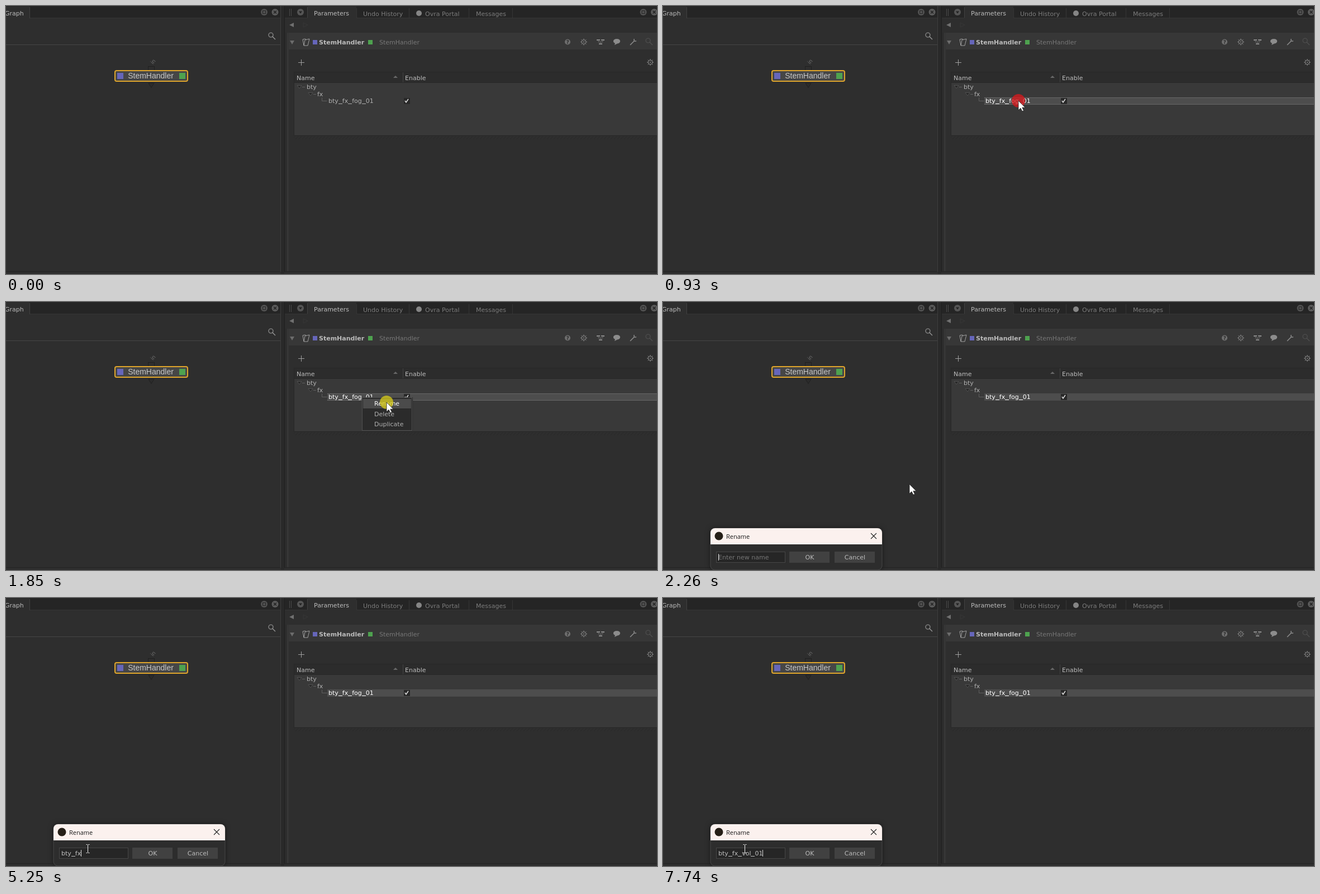
Recreate the animation shown at these times as an HTML page with a canvas. Size 1165 by 481 pixels, loop 8000 ms.

```html
<!DOCTYPE html>
<html lang="en">
<head>
<meta charset="utf-8">
<title>Rename a pass</title>
<style>
html, body { margin: 0; width: 100%; height: 100%; overflow: hidden; background: #2e2e2e; }
canvas { display: block; }
</style>
</head>
<body>
<canvas id="stage" width="1165" height="481"></canvas>
<script>
const ctx = document.getElementById('stage').getContext('2d');
const UI = '11px "DejaVu Sans", sans-serif';
const BOLD = 'bold ' + UI;
const ICON = '#8c8c8c';
const LOOP = 8000, STEP = 83.5;
const NODE = 'StemHandler';

function rect(x, y, w, h, color) {
  ctx.fillStyle = color;
  ctx.fillRect(x, y, w, h);
}

function frame(x, y, w, h, color) {
  ctx.strokeStyle = color;
  ctx.lineWidth = 1;
  ctx.strokeRect(x + .5, y + .5, w - 1, h - 1);
}

function circle(x, y, r, color) {
  ctx.fillStyle = color;
  ctx.beginPath();
  ctx.arc(x, y, r, 0, 7);
  ctx.fill();
}

function shape(d, x, y, fill, stroke, width = 1) {
  const path = new Path2D(d);
  ctx.save();
  ctx.translate(x, y);
  if (fill) { ctx.fillStyle = fill; ctx.fill(path); }
  if (stroke) { ctx.strokeStyle = stroke; ctx.lineWidth = width; ctx.stroke(path); }
  ctx.restore();
}

// Underscores are drawn one digit wide; returns the end of the text.
function text(s, x, y, color, font = UI, align = 'left') {
  ctx.font = font;
  ctx.textAlign = align;
  ctx.fillStyle = color;
  s.split('_').forEach((part, i) => {
    if (i) {
      ctx.fillRect(Math.round(x), y + 1, 7, 1);
      x += 7;
    }
    ctx.fillText(part, x, y);
    x += ctx.measureText(part).width;
  });
  return x;
}

function windowButtons(x) {
  circle(x, 11, 6, '#525252');
  frame(x - 3, 8, 6, 6, '#252525');
  circle(x + 19.5, 11, 6, '#5c5c5c');
  shape('M-2.5-2.5L2.5 2.5M2.5-2.5L-2.5 2.5', x + 19.5, 11, null, '#222', 1.5);
}

function gear(x, y) {
  ctx.strokeStyle = ICON;
  ctx.lineWidth = 1;
  ctx.beginPath();
  ctx.arc(x, y, 3.8, 0, 7);
  for (let i = 0; i < 8; i++) {
    const c = Math.cos(i * Math.PI / 4), s = Math.sin(i * Math.PI / 4);
    ctx.moveTo(x + 4 * c, y + 4 * s);
    ctx.lineTo(x + 6 * c, y + 6 * s);
  }
  ctx.stroke();
  circle(x, y, 1, ICON);
}

function magnifier(x, y, color) {
  shape('M3-1A4 4 0 1 1-5-1A4 4 0 1 1 3-1M2 2L7 7', x, y, null, color, 1.1);
}

function drawGraph() {
  rect(0, 0, 491, 21, '#252525');
  rect(0, 1, 42, 21, '#2e2e2e');
  rect(42, 2, 1, 20, '#414141');
  rect(43, 21, 448, 1, '#363636');
  text('Graph', -2, 17, '#bcbcbc');
  windowButtons(462);
  magnifier(475, 53, '#a0a0a0');
  rect(0, 69, 491, 1, '#454545');
  rect(0, 476, 491, 1, '#242424');
  rect(491, 0, 1, 477, '#3d3d3d');
  rect(492, 0, 6, 481, '#292929');
  rect(498, 0, 1, 477, '#1e1e1e');

  ctx.save();
  ctx.translate(263, 105);
  ctx.rotate(-.85);
  text('in', 0, 0, '#6c6c6c', '10px "Liberation Sans", sans-serif');
  ctx.restore();
  frame(254, 108, 12, 8, '#202020');
  shape('M-5 0H5L0 8Z', 260, 138.5, '#2b2b2b', '#202020');
  ctx.beginPath();
  ctx.roundRect(195, 116, 130, 19, 3);
  ctx.fillStyle = '#464646';
  ctx.fill();
  ctx.strokeStyle = '#dfa52b';
  ctx.lineWidth = 2;
  ctx.stroke();
  rect(199, 120, 11, 11, '#6666ba');
  rect(310, 120, 11, 11, '#4ea24f');
  text(NODE, 259, 130, '#c8c8c8', '14px "Liberation Sans", Arial, sans-serif', 'center');
}

function drawTabs() {
  rect(499, 0, 666, 21, '#252525');
  rect(499, 21, 666, 1, '#363636');
  rect(540, 1, 87, 21, '#2e2e2e');
  rect(539, 2, 1, 19, '#414141');
  for (const x of [627, 721, 828, 906]) rect(x, 4, 1, 17, '#363636');
  rect(507, 5, 1, 13, '#4a4a4a');
  rect(510, 5, 1, 13, '#4a4a4a');
  circle(527, 11, 6, '#555');
  shape('M-3-1.5H3L0 2.5Z', 527, 11, '#222');
  text('Parameters', 551, 17, '#bcbcbc');
  text('Undo History', 639, 18, '#7c7c7c');
  circle(739, 13, 5, '#858585');
  text('Ovra Portal', 750, 18, '#7c7c7c');
  text('Messages', 841, 18, '#7c7c7c');
  windowButtons(1140.5);
}

function drawHeader() {
  shape('M4-4V4L-4 0Z', 511, 34, '#707070');
  shape('M-4-4V4L4 0Z', 536, 34, null, '#373737');
  rect(501, 48, 1, 428, '#262626');
  rect(502, 48, 4, 428, '#353535');
  rect(506, 48, 659, 30, '#373737');
  rect(499, 476, 666, 1, '#242424');
  shape('M-4-3H4L0 4Z', 512, 65, '#6c6c6c');
  shape('M-4 6H3L6-6L-2-4ZM-4 6L-6-5L-2-6L0-5', 537, 65, null, '#a0a0a0');
  rect(549, 61, 8, 8, '#6666ba');
  text(NODE, 560, 69, '#bcbcbc', BOLD);
  rect(648, 61, 8, 8, '#4ea24f');
  text(NODE, 668, 69, '#777');

  circle(1005, 64.5, 5, '#6e6e6e');
  text('?', 1005, 68, '#2e2e2e', 'bold 9px "DejaVu Sans", sans-serif', 'center');
  gear(1034, 64.5);
  rect(1057, 60, 6, 2, ICON);
  rect(1065, 60, 6, 2, ICON);
  rect(1061, 67, 6, 2, ICON);
  shape('M-4-2V0H4V-2M0 0V2', 1064, 64.5, null, '#6c6c6c');
  shape('M0-5C8-5 8 3 1 3.5L-4 6L-3 3C-8 1-7-5 0-5Z', 1093, 64, ICON);
  shape('M-5 5L2-2M2-6V-2H6', 1122, 65, null, ICON, 1.5);
  magnifier(1150, 63, '#525252');
}

function drawTable(selected, focused) {
  shape('M-5.5 0H5.5M0-5.5V5.5', 528.5, 101.5, null, '#a0a0a0');
  gear(1153, 101);
  rect(515, 118, 650, 115, '#393939');
  rect(516, 119, 649, 18, '#2c2c2c');
  frame(515, 118, 660, 115, '#272727');
  rect(516, 137, 649, 1, '#282828');
  rect(710, 119, 1, 18, '#414141');
  text('Name', 520, 133, '#bcbcbc');
  text('Enable', 714, 133, '#bcbcbc');
  shape('M-4 2H4L0-2Z', 697, 127, '#686868');

  ctx.save();
  ctx.beginPath();
  ctx.rect(515, 234, 650, 5);
  ctx.clip();
  for (let x = 512; x < 1170; x += 6) shape('M0 6L6 0', x, 233, null, '#282828');
  ctx.restore();

  for (const [x, y] of [[525, 145], [545, 158]]) {
    shape('M-4-2.5H4L0 3Z', x, y, '#282828', '#505050');
    rect(x + 5, y, 5, 1, '#606060');
  }
  shape('M0 0V6H9', 565.5, 164.5, null, '#606060');
  text('bty', 538, 149, '#b0b0b0');
  text('fx', 557, 162, '#b0b0b0');
  if (selected) rect(575, 164, 590, 13, '#4d4d4d');
  if (focused) {
    for (let x = 575; x < 1165; x += 2) {
      rect(x, 164, 1, 1, '#808080');
      rect(x, 176, 1, 1, '#808080');
    }
  }
  text('bty_fx_fog_01', 577, 174, selected ? '#fff' : '#b0b0b0');
  rect(712, 165, 11, 11, '#282828');
  shape('M-3 0L-1 3L3-3', 717, 170, null, '#ddd', 1.5);
}

function drawMenu(hover) {
  rect(637, 171, 91, 60, '#2b2b2b');
  frame(637, 171, 90, 60, '#505050');
  if (hover) rect(639, 174, 86, 17, '#4b4b4b');
  text('Rename', 659, 186, hover ? '#fff' : '#b0b0b0');
  text('Delete', 659, 205, '#b0b0b0');
  text('Duplicate', 659, 223, '#b0b0b0');
}

const keys = [4020, 4670, 4920, 5170, 5250, 5250, 5660, 5930, 6090, 6340, 7250, 7660, 7740];

function drawDialog(t) {
  ctx.save();
  ctx.shadowColor = '#0008';
  ctx.shadowBlur = 10;
  ctx.beginPath();
  ctx.roundRect(85, 406, 307, 75, 8);
  ctx.fillStyle = '#2d2d2d';
  ctx.fill();
  ctx.shadowBlur = 0;
  ctx.strokeStyle = '#484848';
  ctx.lineWidth = 1;
  ctx.stroke();
  ctx.clip();
  rect(85, 406, 307, 29, '#fbf1ee');
  ctx.restore();
  circle(100, 420, 7.5, '#251f17');
  text('Rename', 113, 424.5, '#191919', '11px "Open Sans", sans-serif');
  shape('M-5-5L5 5M5-5L-5 5', 377, 420, null, '#222', 1.1);

  rect(95, 448, 124, 20, '#262626');
  frame(95, 448, 124, 20, '#464646');
  rect(226, 448, 72, 20, '#414141');
  rect(307, 448, 72, 20, '#414141');
  text('OK', 262.5, 462, '#bcbcbc', UI, 'center');
  text('Cancel', 343.5, 462, '#bcbcbc', UI, 'center');

  const typed = keys.filter(k => k <= t);
  let end = 99;
  if (typed.length) end = text('bty_fx_vol_01'.slice(0, typed.length), 99, 462, '#c0c0c0');
  else text('Enter new name', 99, 462, '#777');
  const blinkStart = typed.length ? typed.at(-1) + 60 : 1980;
  if (t < blinkStart || Math.floor((t - blinkStart) / 510) % 2 === 0)
    rect(Math.round(end), 452, 1, 12, '#ddd');
}

// Pointer stops: step, x, y
const pointer = [
  [1, 672, 259], [3, 655, 218], [5, 637, 172], [6, 636, 170], [15, 636, 170],
  [18, 683, 187], [19, 681, 180], [24, 681, 180], [27, 441, 327],
  [29, 255, 412], [31, 159, 447], [33, 137, 441], [34, 145, 437]
];
// Clicks: first step, end step, colour
const clicks = [[6, 9, '#dace1a'], [11, 14, '#dc181c'], [22, 24, '#dace1a']];

function pointerAt(step) {
  const i = pointer.findIndex(p => p[0] > step);
  if (i < 0) return pointer.at(-1).slice(1);
  const [s0, x0, y0] = pointer[i - 1], [s1, x1, y1] = pointer[i];
  const u = (step - s0) / (s1 - s0);
  return [x0 + (x1 - x0) * u, y0 + (y1 - y0) * u];
}

function drawPointer(step) {
  if (step < 1) return;
  if (step >= 36) {
    shape('M-3-7.5H-1L0-6.5L1-7.5H3M0-6.5V6.5M-3 7.5H-1L0 6.5L1 7.5H3', 146.5, 450, null, '#f0f0f0');
    return;
  }
  const [x, y] = pointerAt(step);
  for (const [from, to, color] of clicks) {
    if (step < from || step >= to) continue;
    ctx.globalAlpha = .75 - .2 * (step - from);
    circle(x, y, 12, color);
    ctx.globalAlpha = 1;
  }
  shape('M0 0V17L4 13.3L6.8 19L9.5 17.8L6.8 12.2H12Z', x, y, '#fff', '#222', .8);
}

function draw(now) {
  const t = now % LOOP;
  const step = Math.floor((t + 10) / STEP);
  rect(0, 0, 1165, 481, '#2e2e2e');
  drawGraph();
  drawTabs();
  drawHeader();
  drawTable(step >= 6, step >= 6 && step < 25);
  if (step >= 13 && step < 24) drawMenu(step >= 16);
  if (step >= 25) drawDialog(t);
  drawPointer(step);
}

const start = performance.now();
function tick() {
  draw(performance.now() - start);
  requestAnimationFrame(tick);
}
tick();
</script>
</body>
</html>
```
